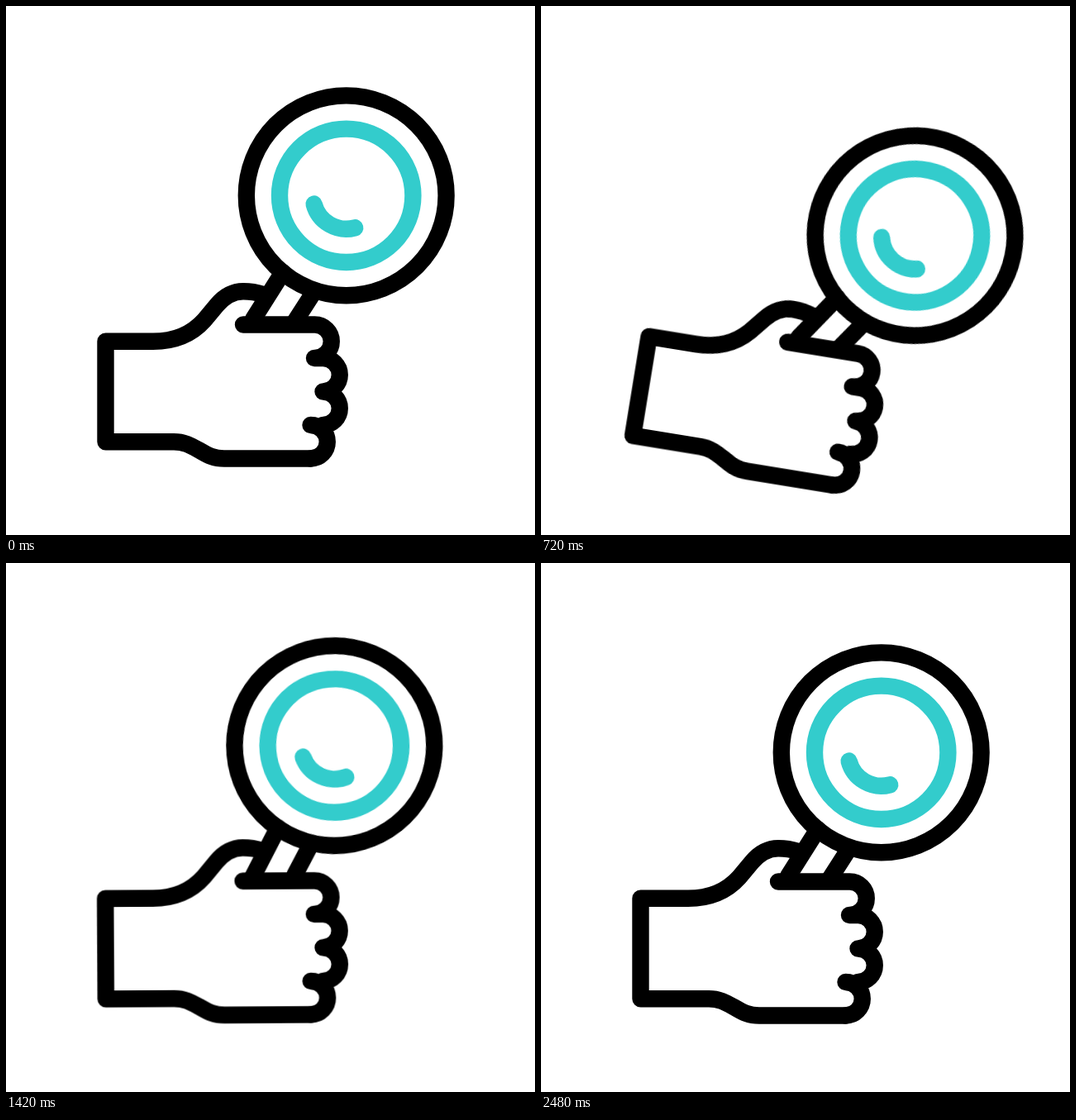
These frames come from a looping animation (640 by 640 pixels, 2.62 s). An HTML page:

```html
<!DOCTYPE html>
<html lang="en">
<head>
<meta charset="utf-8">
<title>Hand with magnifying glass</title>
<style>
  html, body { margin: 0; width: 100%; height: 100%; overflow: hidden; background: #fff; }
  svg {
    display: block; width: 100%; height: 100%;
    fill: none; stroke: #000; stroke-width: 20.4;
    stroke-linecap: round; stroke-linejoin: round;
  }
  .hand, .glass { animation: swing 2620ms cubic-bezier(.333, 0, .667, 1) infinite; }
  .hand { transform-origin: 162px 465.6px; }
  /* the glass repeats the swing of the hand a little later */
  .glass { transform-origin: 321px 382.5px; animation-delay: 80ms; }
  .shine { stroke: #3cc; }

  /* a swing every 400 ms, each 3 degrees smaller, then a rest */
  @keyframes swing {
    0% { transform: rotate(0deg); }
    15.267% { transform: rotate(-15deg); }
    30.534% { transform: rotate(12deg); }
    45.802% { transform: rotate(-9deg); }
    61.069% { transform: rotate(6deg); }
    76.336% { transform: rotate(-3deg); }
    91.603%, 100% { transform: rotate(0deg); }
  }
</style>
</head>
<body>
<svg viewBox="0 0 640 640">
  <g class="hand">
    <path d="M311 349C305 347 297 345.2 287 345.2C276 345.2 265 350 255 362L240 380C224 398 204 405.8 178 405.8H120.5V527.2H203C216 527.2 224 532 233 537S249 547.5 264 547.5H368.5"/>
    <path d="M287 385.5H373.5a20.25 20.25 0 0 1 0 40.5M373 426H383.5a20.25 20.25 0 0 1 0 40.5a20.25 20.25 0 0 1 0 40.5M368.5 507a20.25 20.25 0 0 1 0 40.5"/>
    <g class="glass">
      <path d="M335 322L299 379M372.5 346L350 381"/>
      <circle cx="411.7" cy="229.3" r="120.9"/>
      <g class="shine">
        <circle cx="411.7" cy="229.3" r="80.7"/>
        <path d="M372.6 239.6A40.5 40.5 0 0 0 422.2 268.3"/>
      </g>
    </g>
  </g>
</svg>
</body>
</html>
```
